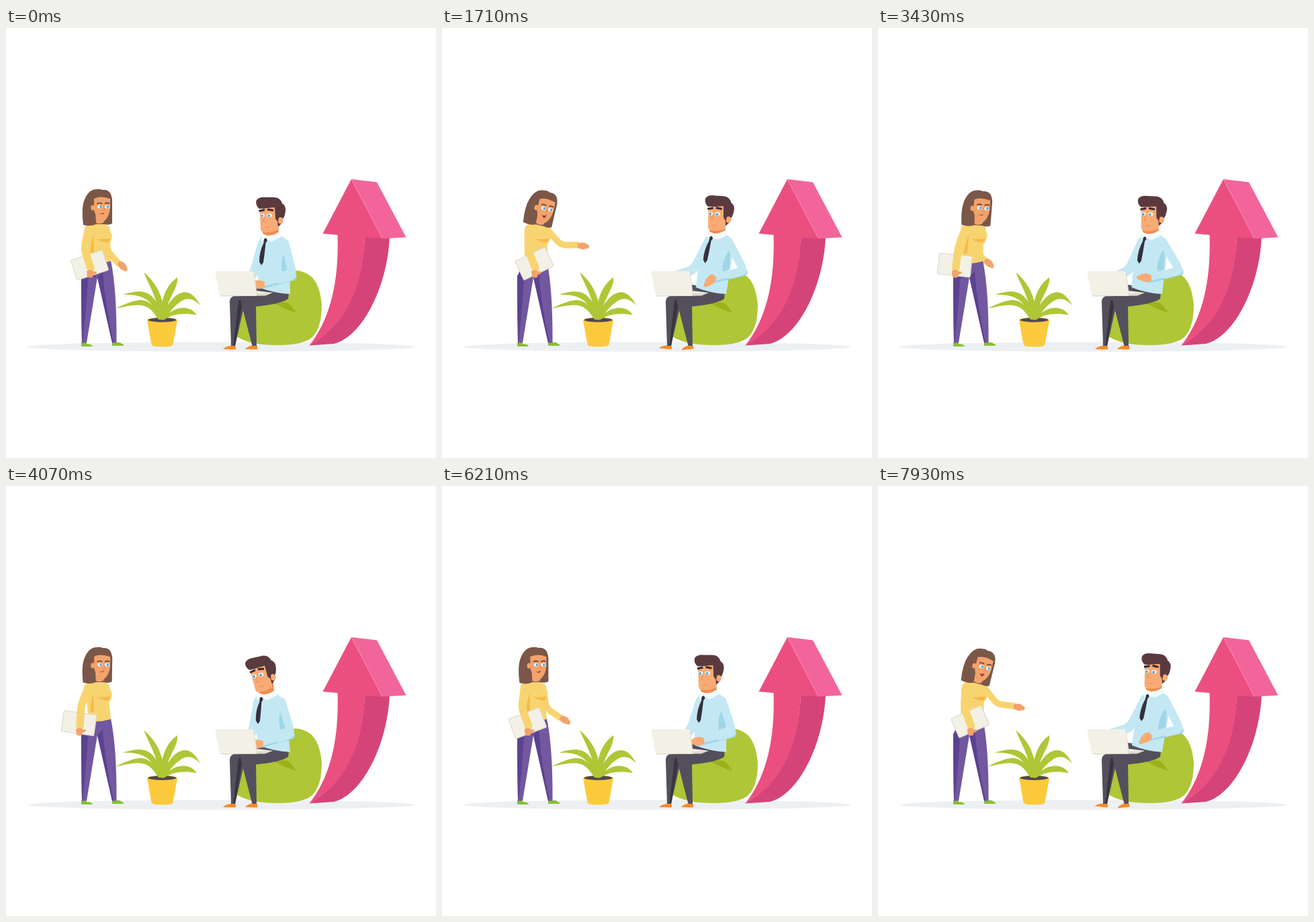
Recreate the animation shown at these times as an HTML page. Size 640 by 640 pixels, loop 8 s.

```html
<!DOCTYPE html>
<html lang="en">
<head>
<meta charset="utf-8">
<title>Talk beside the arrow</title>
<style>
html, body { margin: 0; width: 100%; height: 100%; overflow: hidden; background: #fff; }
svg { display: block; width: 100vw; height: 100vh; }
.limb { fill: none; stroke-linecap: round; stroke-linejoin: round; }
</style>
</head>
<body>
<svg viewBox="0 0 640 640">
  <ellipse cx="320.500" cy="474.500" rx="288" ry="7.300" fill="#edf0f3"/>

  <g id="arrow">
    <path fill="#d54478" d="M534 311H571C568 382 532 459 488 470L451 472.500Q528 430 534 311"/>
    <path fill="#ea4f80" d="M514 225L560 313L534 312Q529 430 451.500 472.500Q497 415 493.500 308L471.500 306Z"/>
    <path fill="#f2659a" d="M514 225L552 229.500L595.500 311.500L560 313.500Z"/>
    <path fill="none" stroke="#f794b8" stroke-width=".7" d="M514 225L560 313"/>
  </g>

  <g id="plant">
    <path fill="#fbca3c" d="M210 435L216.500 471Q217 474.500 232.500 474.500T248.500 471L255 435Z"/>
    <ellipse cx="232.500" cy="435" rx="22.500" ry="4.200" fill="#fbca3c"/>
    <ellipse cx="232.500" cy="434.500" rx="21" ry="3.200" fill="#51474c"/>
    <g fill="#afc636">
      <path d="M228 433C226 402 214 386 205 363.500C222 378 236 398 235 433Z"/>
      <path d="M230 433C230 400 240 382 255 371C257 388 239 402 236 433Z"/>
      <path d="M226 431C218 406 206 396 174 397C200 389 222 386 233 433Z"/>
      <path d="M227 434C212 411 206 408 163 417.500C200 400 212 397 233 434Z"/>
      <path d="M231 432C245 396 270 376 289 412.500C270 394 258 404 236 433Z"/>
      <path d="M231 435C249 414 272 410 284 427C266 424 248 425 236 434Z"/>
    </g>
  </g>

  <g id="woman">
    <path id="wFar" class="limb" stroke="#f8d470" stroke-width="9.500"/>
    <path id="wFarHand" fill="#f2a36b" d="M-3-3Q3-6 8-4L13-1Q16 2 12 4L5 5.500Q0 5-3 3Z"/>
    <path fill="#88bf35" d="M112 474V468H119Q120 471 124 470.500Q128 471 129 474ZM158 473V468H166Q170 467 172 470Q175 470 175.500 473Z"/>
    <path fill="#71589f" d="M116 360L124 346H156Q165 390 164.500 468.500H158L136 371L120 468.500H113Q111.500 410 112 370Z"/>
    <path fill="#5c4291" d="M112 368L122 372Q120 410 114 468.500H113ZM136 371L144 362Q147 410 160 468.500H158ZM112 372L116 361L135 370Q123 372 112 376Z"/>
    <path id="wTorso" fill="#f8d470"/>
    <g id="wShade" fill="#f5ba4b">
      <path d="M135 314Q146 315 155 313Q154 319 151 319.500Q143 319 135 314Z"/>
      <path d="M130 308Q125 324 126 337L131 335Z"/>
    </g>
    <rect id="wBook" x="-24.500" y="-15.500" width="49" height="31" rx="1.500" fill="#f3f1e6" stroke="#e0ddd0" stroke-width="1.300"/>
    <path id="wNear" class="limb" stroke="#f8d470" stroke-width="11.500"/>
    <path id="wNearHand" fill="#f2a36b" d="M-6 1Q-1-3 4 1L9 2Q9 5 4 6L3 10Q-2 12-5 9Z"/>
    <g id="wHead">
      <path fill="#7b5748" d="M115 293Q112 270 116 258Q122 240 135 240Q140 239 143 241Q157 239 158 257L158 291Q153 294 146 292L134 292Q126 296 115 293Z"/>
      <path fill="#f2a36b" d="M133 272L134 290Q140 293 146 289V278Z"/>
      <ellipse cx="129" cy="267.500" rx="2.800" ry="4" fill="#f2a36b"/>
      <path fill="#f2a36b" d="M131 254Q140 249 155 254V268Q154 281 146 287.500Q140 291 136 284L131 272Z"/>
      <path fill="#7b5748" d="M128 263Q128 250 141 250L155 253L158 258Q157 243 143 241Q130 243 128 263Z"/>
      <path fill="none" stroke="#653f34" stroke-width="1.700" d="M135.500 261.500Q139 259.500 143 261.500M147 261.500Q151 259.500 154 261"/>
      <g id="wEyes">
        <path fill="#fff" d="M136.500 266a3.500 2.500 0 0 1 7 0a3.500 2.500 0 0 1-7 0M147 266a3.500 2.500 0 0 1 7 0a3.500 2.500 0 0 1-7 0"/>
        <circle cx="141" cy="266" r="1.900" fill="#4fa9db"/>
        <circle cx="151.300" cy="266" r="1.900" fill="#4fa9db"/>
      </g>
      <path id="wLids" fill="#f2a36b" stroke="#d98b5c" stroke-width=".8" d="M136.500 266a3.500 2.500 0 0 1 7 0a3.500 2.500 0 0 1-7 0M147 266a3.500 2.500 0 0 1 7 0a3.500 2.500 0 0 1-7 0"/>
      <path fill="none" stroke="#df8c58" stroke-width="1" d="M145.500 266L147 271L144.500 272"/>
      <path id="wMouth" fill="#8c2f36" stroke="#a04b3e" stroke-width="1"/>
    </g>
  </g>

  <g id="man">
    <path fill="#afc636" d="M343 415V459Q362 472 405 472Q443 472 456 460Q470 446 470 412Q467 380 453 369Q441 360 429 361L412 372Z"/>
    <path fill="#9db11b" d="M400 410Q416 406 422 411Q429 418 432 424Q415 419 400 410Z"/>
    <path id="mFar" class="limb" stroke="#c3e8f4" stroke-width="14"/>
    <path id="mFootA" fill="#f58b24" d="M323 478Q326 474 336 472.500H341Q343 476 341.500 478.500Z"/>
    <path id="mFootB" fill="#f58b24" d="M356 478Q359 474 366 472.500H373.500Q375 476 374 478.500Z"/>
    <path fill="#544f5c" d="M333 408Q333 398 345 398H358L341 473H335Z"/>
    <path fill="#39343f" d="M346 406L357 398L351 415L341 473H338.500Z"/>
    <path fill="#544f5c" d="M370 382Q395 384 421 394L420 403Q409 411 372 414.500L373 473H366.500L351 413Q347 402 352 398Z"/>
    <path id="mTorso" fill="#c3e8f4" d="M380 311Q392 318 406 307Q419 314 421 324L422 345L423 396Q400 395 376 386L374 350Q374 320 380 311Z"/>
    <path id="mShade" fill="#9fd6e8" d="M417 327Q407 345 411 363L421 359Z"/>
    <path id="mNeck" fill="#f08c50" d="M383 293L405 290L406 306Q394 313 382 306Z"/>
    <path id="mCollar" fill="#f4fbfd" d="M380 307Q394 312 405 304L411 310L395 318L387 314L380 318Z"/>
    <path id="mTie" fill="#36303c" d="M384 314L387 312.500L389 316L386.500 320Q385 336 383 349L380 353L377 348Q377 333 383.500 320Z"/>
    <path fill="#f3f1e6" d="M319 398H384L397 394L372 391Z"/>
    <path fill="#ddd9cb" d="M319 398L397 394L386 398.500L320 399.500Z"/>
    <path id="mFore" class="limb" stroke="#9fd6e8" stroke-width="11"/>
    <path id="mNear" class="limb" stroke="#c3e8f4" stroke-width="12.500"/>
    <path id="mSleeve" class="limb" stroke="#c3e8f4" stroke-width="9"/>
    <path id="mHand" fill="#f8ab74" d="M-4-4Q4-8 9-5L17-2Q20 3 14 4L10 6Q2 8-4 4Z"/>
    <path fill="#e1ddcf" d="M313 362H367Q369 362 369.500 364L374 397Q374 399 372 399H320Z"/>
    <path fill="#f3f1e6" d="M312.500 362H366.500Q368 362 368.500 364L372.500 396Q373 398 371 398H319Q318 398 317.500 396L311.500 364Q311 362 312.500 362Z"/>
    <g id="mHead">
      <path fill="#5b3a3f" d="M377 269Q371 264 372.500 257Q376 251 387 252L396 252Q408 251 411 261Q417 265 416 272Q415 281 412 284L411 290L405 296L400 268Z"/>
      <path fill="#f8ab74" d="M377.500 271Q390 267 401 267L404 286L405 300Q396 305 383 304Q379 303 379 299Z"/>
      <ellipse cx="408.500" cy="286.500" rx="4.200" ry="4.800" fill="#f8ab74"/>
      <path fill="#5b3a3f" d="M377 269Q389 265 400 267L401 284L405 289L406 282Q412 282 412 270L402 260Z"/>
      <path fill="none" stroke="#432a30" stroke-width="3.200" d="M376.500 272.500L385 270.500M389 270L398 271.500"/>
      <ellipse cx="381.500" cy="279.200" rx="3.200" ry="2.600" fill="#fff"/>
      <ellipse cx="392" cy="279" rx="3.700" ry="2.700" fill="#fff"/>
      <circle cx="381" cy="279.500" r="2" fill="#4fa9db"/>
      <circle cx="391.300" cy="279.500" r="2" fill="#4fa9db"/>
      <path fill="none" stroke="#e68d55" stroke-width="1" d="M385 281L383 288L386 289M385 297Q389 295.500 392 296.500"/>
    </g>
  </g>
</svg>
<script>
const LOOP = 8000, CYCLE = 6000, FPS = 14;

// Key points only; everything else on the figures follows from these
const WOMAN = [
  { t: 0, lean: 0, nod: 0, grip: 126, book: -18, x: 167, y: 350 },
  { t: 930, lean: 1, nod: -1, grip: 136, book: -27, x: 197, y: 312 },
  { t: 1820, lean: 7.5, nod: 14, grip: 139, book: -25, x: 202, y: 325 },
  { t: 2710, lean: 15, nod: 10, grip: 127, book: 0, x: 190, y: 347 },
  { t: 4070, lean: 0, nod: 1, grip: 110, book: 8, x: 138, y: 345 },
  { t: 5500, lean: -1, nod: 0, grip: 119.5, book: -10, x: 140, y: 348 }
];
const MAN = [
  { t: 0, lean: 0, hand: 180 },
  { t: 930, lean: 12, hand: 128 },
  { t: 1710, lean: 16, hand: 132 },
  { t: 2710, lean: 18, hand: 182 },
  { t: 3500, lean: 11, hand: 181 },
  { t: 4070, lean: -7, hand: 180 },
  { t: 5500, lean: -6, hand: 180 }
];

const el = id => document.getElementById(id);
const draw = (id, d) => el(id).setAttribute('d', d);
const move = (id, v) => el(id).setAttribute('transform', v);
const show = (id, on) => el(id).setAttribute('visibility', on ? 'visible' : 'hidden');
const clamp = v => Math.min(1, Math.max(0, v));

// Periodic monotone cubic through the key points
function pose(keys, t) {
  const n = keys.length;
  const at = i => keys[(i + n) % n];
  const time = i => at(i).t + Math.floor(i / n) * CYCLE;
  let i = n - 1;
  while (keys[i].t > t) i--;
  const slope = (j, c) => (at(j + 1)[c] - at(j)[c]) / (time(j + 1) - time(j));
  const tangent = (j, c) => {
    const a = slope(j - 1, c), b = slope(j, c);
    return a * b > 0 ? 2 * a * b / (a + b) : 0;
  };
  const h = time(i + 1) - time(i), u = (t - time(i)) / h, v = 1 - u;
  const out = {};
  for (const c in keys[i]) {
    out[c] = (1 + 2 * u) * v * v * at(i)[c] + u * v * v * h * tangent(i, c) +
      u * u * (3 - 2 * u) * at(i + 1)[c] - u * u * v * h * tangent(i + 1, c);
  }
  return out;
}

// Shears so that y = base stays put and the line `height` above moves by dx
const shear = (dx, base, height) => `matrix(1 0 ${-dx / height} 1 ${dx / height * base} 0)`;
const place = (x, y, a, px = 0, py = 0) => `translate(${x} ${y}) rotate(${a}) translate(${-px} ${-py})`;
const angle = (a, b) => Math.atan2(b[1] - a[1], b[0] - a[0]) * 180 / Math.PI;
const mix = (a, b, k) => [a[0] + (b[0] - a[0]) * k, a[1] + (b[1] - a[1]) * k];
const limb = (a, b, c) => `M${a}L${mix(b, a, .25)}Q${b} ${mix(b, c, .25)}L${c}`;

// Elbow of a two-bone arm, bent to the given side
function elbow(a, c, upper, fore, side) {
  const dx = c[0] - a[0], dy = c[1] - a[1], d = Math.hypot(dx, dy);
  const along = (d * d + upper * upper - fore * fore) / (2 * d);
  const out = side * Math.sqrt(Math.max(0, upper * upper - along * along));
  return [a[0] + (dx * along - dy * out) / d, a[1] + (dy * along + dx * out) / d];
}

function drawWoman(t) {
  const { lean, nod, grip, book, x, y } = pose(WOMAN, t);
  const talk = clamp((x - 167) / 25), hem = 9 * clamp((x - 190) / 8);
  const tilt = shear(lean, 350, 58);
  draw('wTorso', `M135 290Q117 289 117 301L124 ${350 + hem}Q140 ${352 + hem} ${156 + hem * .2} ${347 + hem}L153.500 322Q159 314 157 306Q152 297 146 289Z`);
  move('wTorso', tilt);
  move('wShade', tilt);

  const far = [150 + lean * .85, 299], wrist = [x, y], bend = elbow(far, wrist, 32, 25, 1);
  draw('wFar', limb(far, bend, wrist));
  move('wFarHand', place(x + 3, y + 1, angle(bend, wrist) * .8));

  const near = [122.5 + lean, 299], hold = [grip, 357];
  draw('wNear', limb(near, elbow(near, hold, 31, 29, 1), hold));
  move('wNearHand', place(grip, 361, 0));
  move('wBook', place(grip - 1.5, 353 - hem * .25, book));

  move('wHead', place(140 + lean * 1.55 - nod * .3, 288 + lean * .25, nod, 140, 288));
  const blink = Math.abs(t - 930) < 100;
  show('wEyes', !blink);
  show('wLids', blink);
  draw('wMouth', `M140.500 276.500Q143 ${277 + talk} 146 275.500Q145 ${276.5 + talk * 7} 140.500 276.500Z`);
}

function drawMan(t) {
  const { lean, hand } = pose(MAN, t);
  const open = clamp(lean / 12), back = Math.max(0, lean), bow = Math.min(0, lean);
  const lift = -lean * .18, tilt = shear(lean, 395, 85);
  move('mTorso', tilt);
  move('mShade', tilt);
  for (const id of ['mNeck', 'mCollar']) move(id, `translate(${lean} ${lift})`);
  move('mTie', `translate(0 ${lift}) ` + shear(lean * .9, 504, 190));

  draw('mFar', limb([382 + lean * .95, 320 + lift], [370 + lean * .33, 363 - lean * .2], [355 - back * .8, 381 - back * .65]));

  const near = [415 + lean * .7, 320 + lift];
  const wrist = [383 + open * 22 + bow * .3, 381 - open * 8 - bow * .3];
  const bend = elbow(near, wrist, 50, 46, -1);
  draw('mNear', limb(near, bend, mix(bend, wrist, .45)));
  draw('mFore', `M${bend[0]} ${bend[1] + 2}L${wrist[0]} ${wrist[1] + 1}`);
  draw('mSleeve', `M${bend}L${wrist[0]} ${wrist[1] - 1}`);
  move('mHand', place(wrist[0] - 2, wrist[1] + 1 - open * 2, hand));

  move('mHead', place(393 + lean * 1.05, 303 + lift * .8, lean * .22 + bow * 1.5, 393, 303));
  const feet = clamp((lean - 12) / 4);
  move('mFootA', `rotate(${feet * 5} 340 475)`);
  move('mFootB', `rotate(${feet * -6} 368 475)`);
}

function frame(now) {
  const step = Math.floor((now % LOOP + 5) * FPS / 1000);
  const t = step * 1000 / FPS % CYCLE;
  drawWoman(t);
  drawMan(t);
  requestAnimationFrame(frame);
}
frame(0);
</script>
</body>
</html>
```
